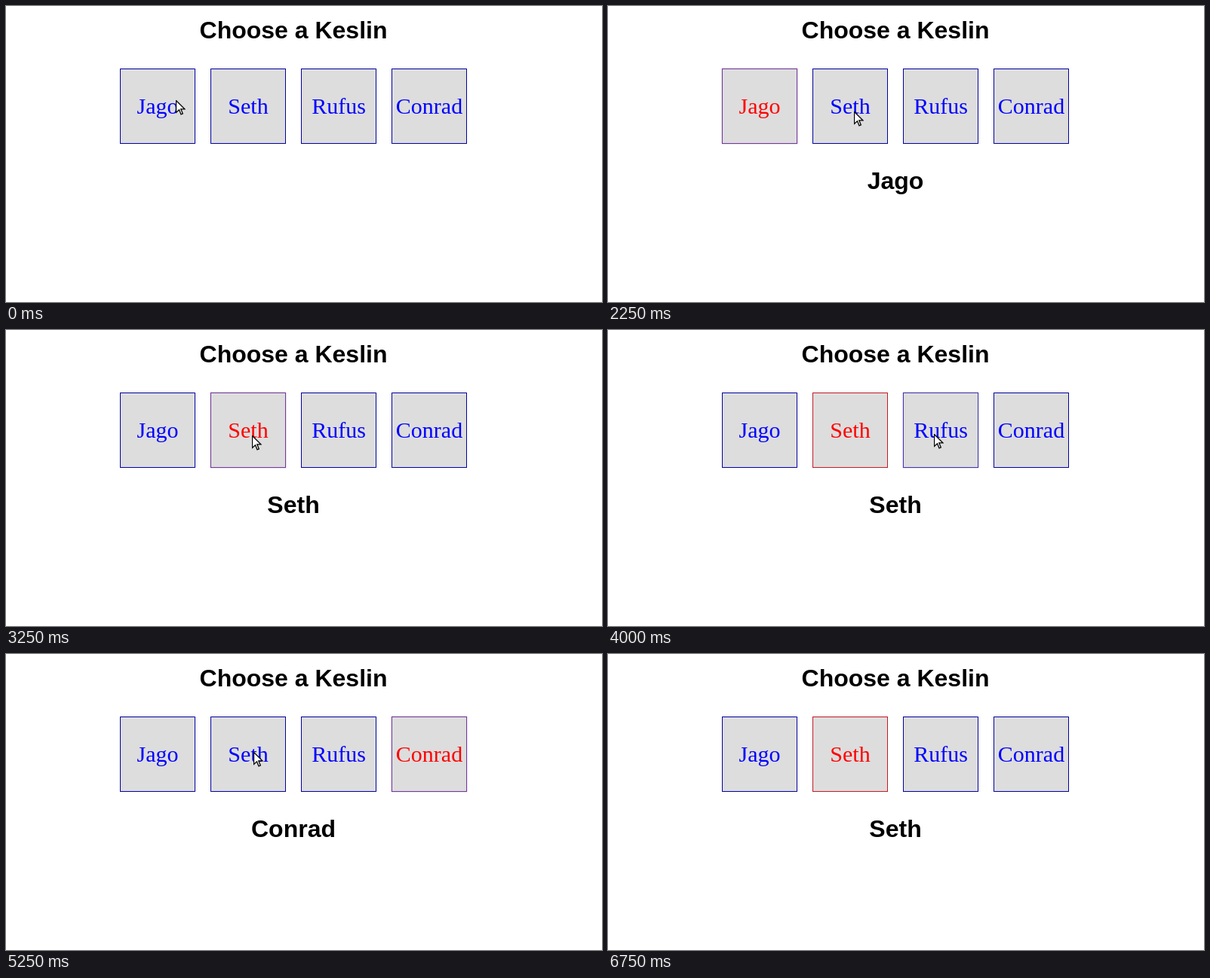
Write an HTML page that moves like this. It is 790 px wide and 393 px high and loops after 7000 ms.

```html
<!DOCTYPE html>
<html lang="en">
<head>
<meta charset="utf-8">
<title>Choose a Keslin</title>
<style>
  html, body {
    margin: 0;
    width: 100%;
    height: 100%;
    overflow: hidden;
    background: #fff;
  }
  :root {
    --edge: #0000a0;
    --edge-on: #c41a22;
    --edge-focus: #74399a;
    --edge-press: #4038b0;
    --ring: 0 0 1px rgba(116, 57, 154, .8);
    --no-ring: 0 0 1px rgba(116, 57, 154, 0);
  }
  h1, .name {
    position: absolute;
    left: 0;
    width: 762px;
    margin: 0;
    text-align: center;
    font: bold 32px/36px "Liberation Sans", Arial, sans-serif;
    color: #000;
  }
  h1 { top: 14px; }
  .name { top: 214px; opacity: 0; }

  .tile {
    position: absolute;
    top: 83px;
    width: 100px;
    height: 100px;
    box-sizing: border-box;
    border: 1px solid var(--edge);
    background: #ddd;
    box-shadow: var(--no-ring);
    color: #00f;
    font: 30px/33px "Liberation Serif", "Times New Roman", serif;
    text-align: center;
    white-space: nowrap;
    padding-top: 32px;
  }
  .t1 { left: 151px; animation-name: tile1; }
  .t2 { left: 271px; animation-name: tile2; }
  .t3 { left: 391px; animation-name: tile3; }
  .t4 { left: 511px; animation-name: tile4; }
  .n1 { animation-name: name1; }
  .n2 { animation-name: name2; }
  .n3 { animation-name: name3; }
  .n4 { animation-name: name4; }

  .cursor {
    position: absolute;
    left: 0;
    top: 0;
    width: 13px;
    height: 20px;
    animation-name: move;
  }
  .tile, .name, .cursor {
    animation-duration: 7s;
    animation-timing-function: step-end;
    animation-iteration-count: infinite;
  }

  /* pressing moves the focus ring, releasing selects */
  @keyframes tile1 {
    0%      { color: #00f; border-color: var(--edge); box-shadow: var(--no-ring); }
    17.857% { color: #f00; border-color: var(--edge-focus); box-shadow: var(--ring); }
    42.857% { color: #f00; border-color: var(--edge-on); box-shadow: var(--no-ring); }
    46.428% { color: #00f; border-color: var(--edge); box-shadow: var(--no-ring); }
  }
  @keyframes tile2 {
    0%      { color: #00f; border-color: var(--edge); box-shadow: var(--no-ring); }
    42.857% { color: #00f; border-color: var(--edge-press); box-shadow: var(--ring); }
    46.428% { color: #f00; border-color: var(--edge-focus); box-shadow: var(--ring); }
    57.142% { color: #f00; border-color: var(--edge-on); box-shadow: var(--no-ring); }
    60.714% { color: #00f; border-color: var(--edge); box-shadow: var(--no-ring); }
    78.571% { color: #f00; border-color: var(--edge-focus); box-shadow: var(--ring); }
    96.428%, 100% { color: #f00; border-color: var(--edge-on); box-shadow: var(--no-ring); }
  }
  @keyframes tile3 {
    0%      { color: #00f; border-color: var(--edge); box-shadow: var(--no-ring); }
    57.142% { color: #00f; border-color: var(--edge-press); box-shadow: var(--ring); }
    60.714% { color: #f00; border-color: var(--edge-focus); box-shadow: var(--ring); }
    67.857% { color: #00f; border-color: var(--edge); box-shadow: var(--no-ring); }
  }
  @keyframes tile4 {
    0%      { color: #00f; border-color: var(--edge); box-shadow: var(--no-ring); }
    67.857% { color: #f00; border-color: var(--edge-focus); box-shadow: var(--ring); }
    78.571% { color: #00f; border-color: var(--edge); box-shadow: var(--no-ring); }
  }

  @keyframes name1 { 0%, 46.428% { opacity: 0; } 17.857% { opacity: 1; } }
  @keyframes name2 { 0%, 60.714% { opacity: 0; } 46.428%, 78.571%, 100% { opacity: 1; } }
  @keyframes name3 { 0%, 67.857% { opacity: 0; } 60.714% { opacity: 1; } }
  @keyframes name4 { 0%, 78.571% { opacity: 0; } 67.857% { opacity: 1; } }

  @keyframes move {
    0%      { transform: translate(225px, 125px); opacity: 1; }
    3.571%  { transform: translate(220px, 121px); }
    25%     { transform: translate(237px, 125px); }
    28.571% { transform: translate(301px, 140px); }
    32.142% { transform: translate(326px, 140px); }
    50%     { transform: translate(414px, 141px); }
    53.571% { transform: translate(432px, 138px); }
    60.714% { transform: translate(539px, 138px); }
    64.285% { transform: translate(573px, 138px); }
    71.428% { transform: translate(376px, 141px); }
    75%     { transform: translate(328px, 130px); }
    82.142% { transform: translate(336px, 204px); }
    85.714%, 100% { transform: translate(336px, 204px); opacity: 0; }
  }
</style>
</head>
<body>
  <h1>Choose a Keslin</h1>

  <div class="tile t1">Jago</div>
  <div class="tile t2">Seth</div>
  <div class="tile t3">Rufus</div>
  <div class="tile t4">Conrad</div>

  <div class="name n1">Jago</div>
  <div class="name n2">Seth</div>
  <div class="name n3">Rufus</div>
  <div class="name n4">Conrad</div>

  <svg class="cursor" viewBox="0 0 13 20">
    <path d="M.5 .5V16.5L4.5 12.8L7 18.8L9.3 17.8L6.8 11.8H11.8Z" fill="#fff" stroke="#000" stroke-width="1.3"/>
  </svg>
</body>
</html>
```
